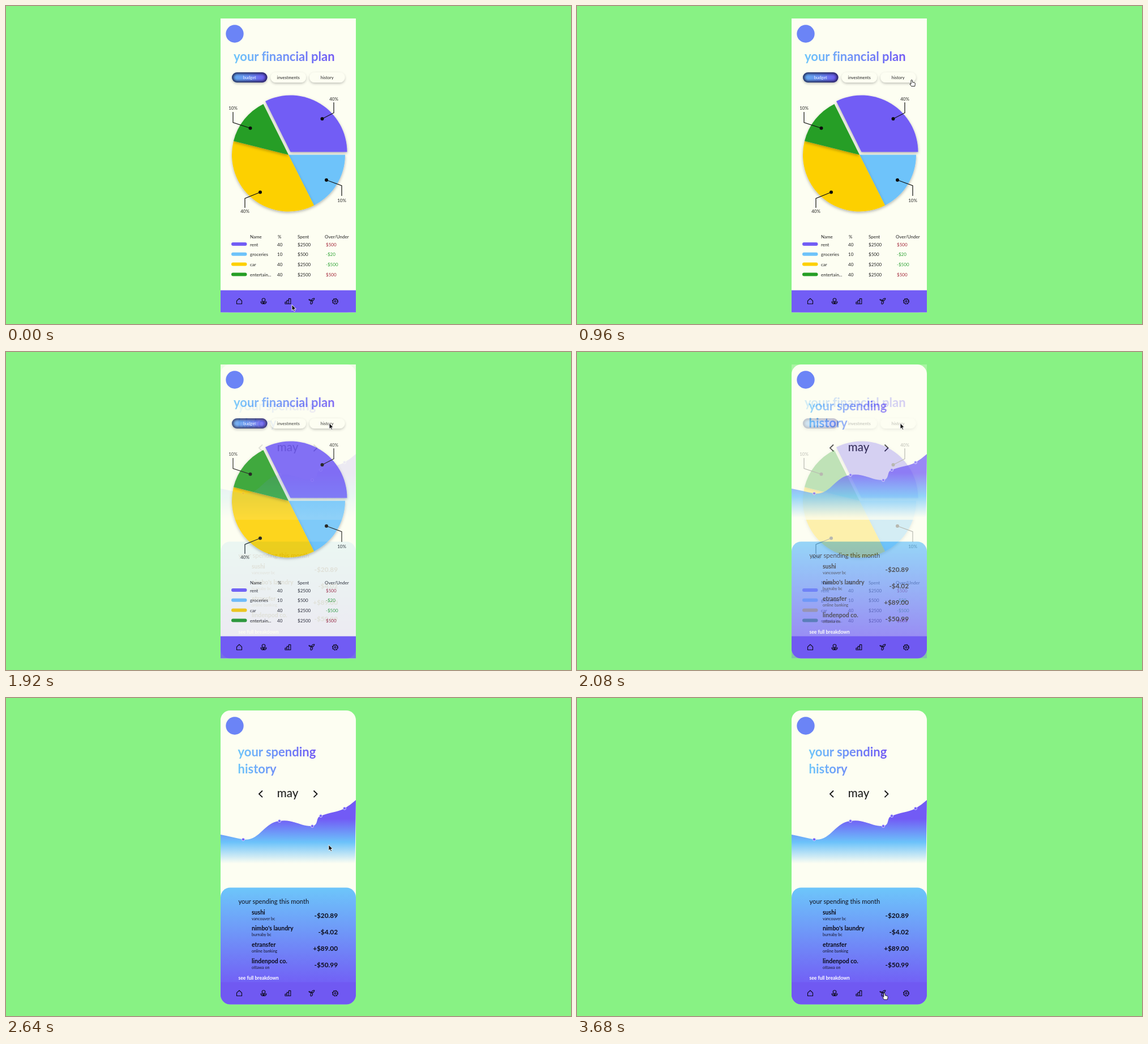
An HTML page for the animation above (3.76 s loop, 998 by 561 pixels).

```html
<!DOCTYPE html>
<html lang="en">
<head>
<meta charset="utf-8">
<title>Financial plan</title>
<style>
  html, body { margin: 0; width: 100%; height: 100%; overflow: hidden; background: #88f284; }
  svg { display: block; width: 100%; height: 100%; font: 8px Lato, "Open Sans", sans-serif; font-variant-ligatures: none; fill: #222; }
  .title { font-size: 22px; font-weight: 700; }
  .pill { font-size: 7.5px; text-anchor: middle; }
  .mid { text-anchor: middle; }
  .shop { font-size: 10.5px; font-weight: 700; fill: #0b0b18; }
  .place { font-size: 7.1px; fill: #15152c; }
  .sum { font-size: 11.8px; font-weight: 700; text-anchor: end; fill: #0b0b18; }
  .line { fill: none; stroke: #111; stroke-width: 1.2; }
  .icon { fill: none; stroke: #0c0a1c; stroke-width: 1.15; stroke-linejoin: round; stroke-linecap: round; }
  .cursor { stroke-width: .9; stroke-linejoin: round; }
</style>
</head>
<body>
<svg viewBox="0 0 998 561">
  <defs>
    <linearGradient id="planInk" gradientUnits="userSpaceOnUse" x1="402" x2="579" y1="0" y2="0">
      <stop stop-color="#6fc6fa"/><stop offset="1" stop-color="#715af4"/>
    </linearGradient>
    <linearGradient id="historyInk" gradientUnits="userSpaceOnUse" x1="410" x2="548" y1="0" y2="0">
      <stop stop-color="#6fc6fa"/><stop offset="1" stop-color="#715af4"/>
    </linearGradient>
    <linearGradient id="pillFill">
      <stop stop-color="#64b0f2"/><stop offset=".5" stop-color="#6a8cf0"/><stop offset="1" stop-color="#6f55ee"/>
    </linearGradient>
    <linearGradient id="water" gradientUnits="userSpaceOnUse" x1="0" x2="0" y1="213" y2="292">
      <stop stop-color="#725bf5"/><stop offset=".52" stop-color="#6bc2fa"/><stop offset="1" stop-color="#fdfef2"/>
    </linearGradient>
    <linearGradient id="panelFill" gradientUnits="userSpaceOnUse" x1="0" x2="0" y1="338" y2="512">
      <stop stop-color="#6dc4fa"/><stop offset="1" stop-color="#725bf5"/>
    </linearGradient>
    <filter id="lift" x="-20%" y="-50%" width="140%" height="220%">
      <feDropShadow dx="0" dy="2" stdDeviation="2.2" flood-opacity=".24"/>
    </filter>
    <filter id="soft" x="-20%" y="-20%" width="140%" height="140%">
      <feDropShadow dx="0" dy="2" stdDeviation="2.5" flood-opacity=".3"/>
    </filter>
    <filter id="blur" x="-20%" y="-60%" width="140%" height="220%"><feGaussianBlur stdDeviation="2.2"/></filter>
    <clipPath id="pillClip"><rect x="399" y="117" width="62.5" height="18" rx="9"/></clipPath>
    <clipPath id="screen"><rect x="379" y="22" width="239" height="518.5" rx="17"/></clipPath>
    <g id="icons" class="icon">
      <path d="M407.5 520.2 412 516 416.5 520.2V525.5H407.5Z"/>
      <circle cx="455" cy="518.5" r="2.8"/>
      <path d="M455 521.5V525.5M455 525.5Q450.5 525.5 450 521.8 454 522 455 525.5 456 522 460 521.8 459.5 525.5 455 525.5Z"/>
      <path d="M493 525.5V522.3H496.2V519.3H499.4V516.3H502.8V525.5ZM496.2 522.3V525.5M499.4 519.3V525.5"/>
      <path d="M544.8 515.8Q540 515.5 539.7 520 544 520 544.8 515.8ZM539.7 520Q538.2 517.5 535 517.5 535.5 520.5 539.7 520ZM539.7 520Q536.5 525 538.5 525.8 542 526 541.5 519.8"/>
      <circle cx="581.5" cy="521" r="4.2"/>
      <circle cx="581.5" cy="521" r="5" stroke-dasharray="1.96 1.96" stroke-linecap="butt"/>
      <circle cx="581.5" cy="521" r="1.5"/>
    </g>
    <circle id="badge" cx="404" cy="49" r="15.7" fill="#6b84f6"/>
  </defs>

  <g id="history" clip-path="url(#screen)"></g>
  <g id="plan"></g>
  <g id="wave" clip-path="url(#screen)"></g>
  <g class="cursor">
    <path id="arrow" d="M0 0V10.2L2.3 8.2 4 11.8 5.7 11 4.1 7.5H7.3Z" fill="#111" stroke="#fff"/>
    <path id="hand" d="M-1.2 .9Q0-.7 1.2 .9V4.2L5 5.2Q6.3 5.6 6.1 7.2L5.5 11.5H-.6L-3.3 7.8Q-3.6 6.3-1.2 7.4Z" fill="#fff" stroke="#111"/>
  </g>
</svg>
<script>
const $ = id => document.getElementById(id);
const text = (x, y, s, attrs = '') => `<text x="${x}" y="${y}" ${attrs}>${s}</text>`;
const box = (x, y, w, h, attrs) => `<rect x="${x}" y="${y}" width="${w}" height="${h}" ${attrs}/>`;
const dot = (x, y, r, attrs = '') => `<circle cx="${x}" cy="${y}" r="${r}" ${attrs}/>`;
const purple = '#725df5', blue = '#6ec3fa', yellow = '#fdd004', green = '#259e25';
const red = '#a3283a', under = '#2fa336';
const page = box(379, 22, 239, 518.5, 'fill="#fdfef2"') + '<use href="#badge"/>';

function slice(cx, cy, from, to, color) {
  const at = deg => {
    const a = deg * Math.PI / 180;
    return `${cx + 100 * Math.cos(a)} ${cy + 100 * Math.sin(a)}`;
  };
  return `<path d="M${cx} ${cy}L${at(from)}A100 100 0 0 1 ${at(to)}Z" fill="${color}" filter="url(#soft)"/>`;
}

function pill(x, label, active) {
  const body = box(x, 117, 62.5, 18, `rx="9" fill="${active ? 'url(#pillFill)' : '#fdfef2'}" filter="url(#lift)"`);
  const inset = active
    ? `<g clip-path="url(#pillClip)">${box(x, 117, 62.5, 18, 'rx="9" fill="none" stroke="#1c1c48" stroke-width="5" filter="url(#blur)"')}</g>`
    : '';
  return body + inset + text(x + 31.25, 129, label, `class="pill" fill="${active ? '#eef2ff' : '#222'}"`);
}

const callout = (x, y, ex, ey, end, label, base) =>
  `<path class="line" d="M${x} ${y}L${ex} ${ey}V${end}"/>` + dot(x, y, 3, 'fill="#0c0c0c"') +
  text(ex, base, label, 'class="mid"');

const budget = [
  ['rent', 40, '$2500', '$500', purple, red],
  ['groceries', 10, '$500', '-$20', blue, under],
  ['car', 40, '$2500', '-$500', yellow, under],
  ['entertain...', 40, '$2500', '$500', green, red],
].map(([name, pct, spent, diff, color, ink], i) => {
  const y = 423.5 + i * 17.8;
  return box(398, y - 6.5, 27.5, 6, `rx="3" fill="${color}"`) + text(431, y, name) + text(479, y, pct) +
    text(515, y, spent) + text(565, y, diff, `fill="${ink}"`);
}).join('');

$('plan').innerHTML = page +
  text(402, 97, 'your financial plan', 'class="title" fill="url(#planInk)"') +
  pill(399, 'budget', true) + pill(467.5, 'investments') + pill(536, 'history') +
  slice(502.5, 257.5, 243.6, 360, purple) + slice(499, 262.5, 0, 63.2, blue) +
  slice(499, 262.5, 63.2, 194, yellow) + slice(499, 262.5, 194, 243.6, green) +
  callout(558.5, 199, 579, 188.5, 170, '40%', 166.5) +
  callout(431.5, 215.5, 401, 205.5, 187, '10%', 182.5) +
  callout(566, 307, 593, 317, 335, '10%', 346) +
  callout(449, 328.5, 422, 339.5, 356, '40%', 365.3) +
  text(431, 410, 'Name') + text(480, 410, '%') + text(515, 410, 'Spent') + text(563, 410, 'Over/Under') +
  budget + box(379, 501.5, 239, 39, `fill="${purple}"`) + '<use href="#icons"/>';

const spending = [
  ['sushi', 'vancouver bc', '-$20.89'],
  ["nimbo's laundry", 'burnaby bc', '-$4.02'],
  ['etransfer', 'online banking', '+$89.00'],
  ['lindenpod co.', 'ottawa on', '-$50.99'],
].map(([shop, place, sum], i) => {
  const y = 381.5 + i * 28.9;
  return text(434, y, shop, 'class="shop"') + text(434, y + 10, place, 'class="place"') +
    text(586, y + 6.7, sum, 'class="sum"');
}).join('');

$('history').innerHTML = page +
  text(409.5, 102.5, 'your spending', 'class="title" fill="url(#historyInk)"') +
  text(409.5, 132.5, 'history', 'class="title" fill="url(#historyInk)"') +
  text(497.5, 175, 'may', 'class="mid" font-size="20.5" font-weight="500"') +
  '<path class="line" style="stroke-width:1.8" d="M453 163.5 447 169.3 453 175.2M543.5 163.5 549.5 169.3 543.5 175.2"/>' +
  box(379, 334.5, 239, 220, 'rx="17" fill="url(#panelFill)"') +
  text(410.5, 362.7, 'your spending this month', 'font-size="11.2" fill="#10101e"') + spending +
  text(410.5, 497.3, 'see full breakdown', 'font-size="8.5" font-weight="700" fill="#fff"') +
  box(379, 501.5, 239, 39, 'fill="#7059f2"') + '<use href="#icons"/>';

$('wave').innerHTML =
  `<path fill="url(#water)" d="M379 241C392 243 406 247.5 419 249.5C448 253 456 219 483 217C507 213 520 227 541 226
    C553 224 546 211 556 208C571 202 586 201 598 194.7Q608 189 618 180L616.5 296H379Z"/>` +
  [[419, 249.5], [483, 217], [541, 226], [556, 208], [598, 194.7]]
    .map(([x, y]) => dot(x, y, 2.5, `fill="${purple}" stroke="#dcdcff" stroke-width=".9"`)).join('');

const LOOP = 3760, STEP = 80;
const ease = (t, from, to) => {
  const u = Math.min(1, Math.max(0, (t - from) / (to - from)));
  return u * u * (3 - 2 * u);
};
const bezier = (u, a, b, c, d) => {
  const v = 1 - u;
  return v * v * v * a + 3 * v * v * u * b + 3 * v * u * u * c + u * u * u * d;
};

function draw(t) {
  let x, y;
  if (t < 2320) {
    const u = ease(t, 0, 1080);
    x = bezier(u, 505, 770, 775, 571);
    y = bezier(u, 527, 500, 160, 125.5);
  } else {
    const u = ease(t, 2320, 3140);
    x = 571 - 28 * u ** 3;
    y = 125.5 + 395 * u;
  }
  const pointing = (t >= 880 && t < 1280) || t >= 3120;
  for (const [id, on] of [['arrow', !pointing], ['hand', pointing]]) {
    $(id).setAttribute('transform', `translate(${x} ${y})`);
    $(id).style.display = on ? '' : 'none';
  }
  const fade = ease(t, 1840, 2210);
  $('plan').style.opacity = 1 - fade;
  $('wave').style.opacity = fade;
}

const start = performance.now();
function tick() {
  const t = (performance.now() - start) % LOOP;
  draw(Math.floor(t / STEP) * STEP);
  requestAnimationFrame(tick);
}
tick();
</script>
</body>
</html>
```
